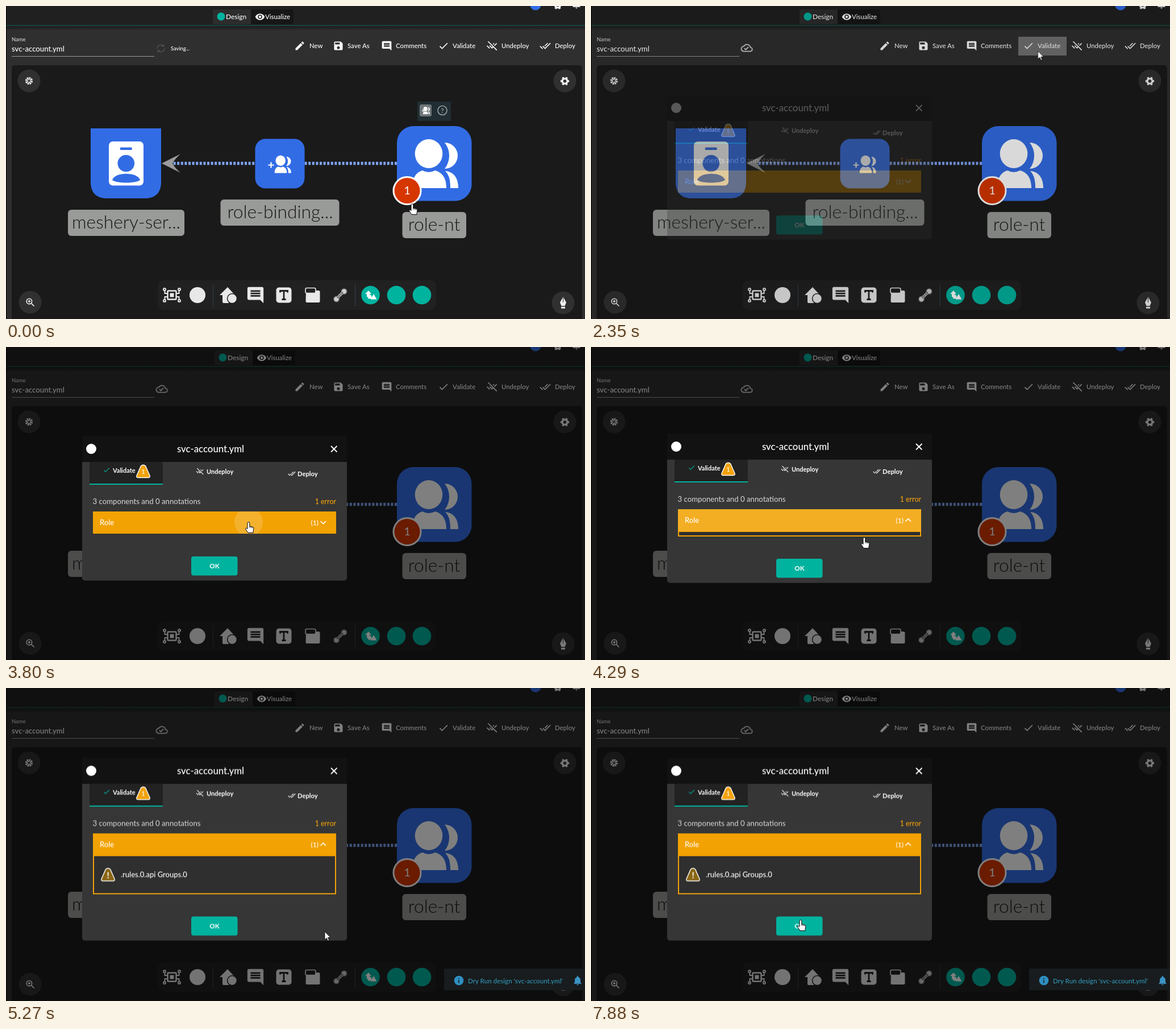
Animation, 1019 px wide and 550 px high, one loop 8000 ms. Source, as an HTML page:

```html
<!DOCTYPE html>
<html lang="en">
<head>
<meta charset="utf-8">
<title>Design validation</title>
<style>
@property --g { syntax: '<number>'; inherits: true; initial-value: 0; }
html, body { margin: 0; width: 100%; height: 100%; overflow: hidden; background: #1a1a1a; }
svg.stage { display: block; width: 100vw; height: 100vh; }
text { font-family: Lato, "Open Sans", sans-serif; font-size: 11.4px; font-weight: 500; fill: #fff; }
.mid { text-anchor: middle; }
.label { font-size: 31.8px; font-weight: 300; fill: #161616; text-anchor: middle; }
.bar { fill: #fff; }
.blue { fill: #326ce5; }
.teal { fill: #00b39f; }
.ink { fill: #e8e8e8; }

.an { animation: 8s step-end infinite; }
#tabs { animation-name: tabs; }
#saving { animation-name: saving; }
#saved { animation-name: saved; }
#tip { animation-name: tip; }
#hover { animation-name: hover; }
#press { animation-name: press; }
#shade { animation-name: shade; }
#modal { animation-name: grow, appear; transform: translateY(calc(156px - var(--g) * .5px)); }
#body { height: calc(254.5px + var(--g) * 1px); }
#detail { height: max(0px, calc(var(--g) * 1px)); }
#ok { transform: translateY(calc(var(--g) * 1px)); }
#ripple { animation-name: ripple; }
#glow { animation-name: glow; }
#down { animation-name: down; }
#up { animation-name: up; }
#item { animation-name: item; }
#row { animation-name: row; }
#toast { animation-name: toast; }
#cursor { animation-name: cursor; }
#hand { animation-name: hand; }
#arrow { animation-name: arrow; }

@keyframes tabs { 0% { transform: none } 27.875%, 100% { transform: translateX(3px) } }
@keyframes saving { 0% { opacity: 1 } 7.875%, 100% { opacity: 0 } }
@keyframes saved { 0% { opacity: 0 } 7.875%, 100% { opacity: 1 } }
@keyframes tip { 0% { opacity: 1 } 14.75% { opacity: .12 } 18.125% { opacity: .07 } 21.125%, 100% { opacity: 0 } }
@keyframes hover { 0% { opacity: 0 } 27.875% { opacity: 1 } 31% { opacity: .5 } 34%, 100% { opacity: 0 } }
@keyframes press { 0% { opacity: 0 } 26% { opacity: .18 } 27.875%, 100% { opacity: 0 } }
@keyframes shade {
  0% { opacity: 0 } 27.875% { opacity: .05 } 29.375% { opacity: .15 } 31% { opacity: .35 }
  32.5% { opacity: .47 } 34%, 100% { opacity: .5 }
}
@keyframes appear {
  0% { opacity: 0 } 27.875% { opacity: .06 } 29.375% { opacity: .29 } 31% { opacity: .7 }
  32.5% { opacity: .93 } 34%, 100% { opacity: 1 }
}
@keyframes grow {
  0% { --g: 0 } 53.625% { --g: 8 } 55.125% { --g: 26 } 56.625% { --g: 48 }
  58.125% { --g: 61 } 59.625%, 100% { --g: 67 }
}
@keyframes ripple { 0% { opacity: 0 } 45.625% { opacity: .12 } 47.5% { opacity: .17 } 49% { opacity: .08 } 50.5%, 100% { opacity: 0 } }
@keyframes glow { 0% { opacity: 0 } 50.5% { opacity: .13 } 61.125%, 100% { opacity: 0 } }
@keyframes down { 0% { opacity: 1 } 53.625%, 100% { opacity: 0 } }
@keyframes up { 0% { opacity: 0 } 53.625%, 100% { opacity: 1 } }
@keyframes item { 0% { opacity: 0 } 56.625%, 100% { opacity: 1 } }
@keyframes row { 0% { opacity: 0 } 79.625% { opacity: 1 } 95.125%, 100% { opacity: 0 } }
@keyframes toast { 0% { opacity: 0 } 55.125% { opacity: .6 } 56.625%, 100% { opacity: 1 } }
@keyframes hand {
  0% { opacity: 1 } 14.75% { opacity: 0 } 21.125% { opacity: 1 } 27.875% { opacity: 0 }
  39.625% { opacity: 1 } 55.125% { opacity: 0 } 79.625% { opacity: 1 } 95.125% { opacity: 0 } 97%, 100% { opacity: 1 }
}
@keyframes arrow {
  0% { opacity: 0 } 14.75% { opacity: 1 } 21.125% { opacity: 0 } 27.875% { opacity: 1 }
  39.625% { opacity: 0 } 55.125% { opacity: 1 } 79.625% { opacity: 0 } 95.125% { opacity: 1 } 97%, 100% { opacity: 0 }
}
@keyframes cursor {
  0% { transform: translate(714px, 348px) }
  1.5% { transform: translate(711px, 345px) }
  3% { transform: translate(708px, 342px) }
  11% { transform: translate(732px, 335px) }
  12.875% { transform: translate(779px, 211px) }
  14.75% { transform: translate(775px, 150px) }
  16.625% { transform: translate(774px, 120px) }
  18.125% { transform: translate(773px, 107px) }
  19.625% { transform: translate(785px, 80px) }
  21.125% { transform: translate(788px, 66px) }
  27.875% { transform: translate(786.5px, 79px) }
  35.875% { transform: translate(673px, 147px) }
  37.75% { transform: translate(411px, 271px) }
  39.625% { transform: translate(339px, 305px) }
  41.125% { transform: translate(362px, 306px) }
  42.625% { transform: translate(405px, 308px) }
  44.125% { transform: translate(426px, 308px) }
  53.625% { transform: translate(480px, 335px) }
  55.125% { transform: translate(550px, 375px) }
  56.625% { transform: translate(591px, 396px) }
  58.125% { transform: translate(583px, 410px) }
  61.125% { transform: translate(564px, 439px) }
  65.875% { transform: translate(561px, 428px) }
  67.375% { transform: translate(557px, 416px) }
  68.875% { transform: translate(554px, 407px) }
  75.875% { transform: translate(527px, 395px) }
  77.75% { transform: translate(357px, 362px) }
  79.625% { transform: translate(276px, 336.5px) }
  81.125% { transform: translate(290px, 336px) }
  82.625% { transform: translate(322px, 334px) }
  84.125% { transform: translate(352px, 332px) }
  86% { transform: translate(367px, 334px) }
  87.875% { transform: translate(368px, 334px) }
  93.25% { transform: translate(368px, 341px) }
  95.125% { transform: translate(368px, 386px) }
  97% { transform: translate(368px, 402px) }
  98.5%, 100% { transform: translate(368px, 408px) }
}
</style>
</head>
<body>
<svg class="stage" viewBox="0 0 1019 550" preserveAspectRatio="none">
<defs>
  <symbol id="edit" viewBox="0 0 24 24"><path d="M3 17.25V21h3.75L17.8 9.94l-3.75-3.75zM20.7 7.04c.4-.39.4-1.02 0-1.41l-2.33-2.34c-.39-.39-1.02-.39-1.41 0l-1.83 1.83 3.75 3.75z"/></symbol>
  <symbol id="save" viewBox="0 0 24 24"><path d="M17 3H5a2 2 0 0 0-2 2v14c0 1.1.9 2 2 2h14a2 2 0 0 0 2-2V7zm-5 16a3 3 0 1 1 0-6 3 3 0 0 1 0 6zm3-10H5V5h10z"/></symbol>
  <symbol id="note" viewBox="0 0 24 24"><path d="M22 4a2 2 0 0 0-2-2H4a2 2 0 0 0-2 2v12c0 1.1.9 2 2 2h14l4 4zM18 14H6v-2h12zm0-3H6V9h12zm0-3H6V6h12z"/></symbol>
  <symbol id="done" viewBox="0 0 24 24"><path d="M9 16.2 4.8 12l-1.4 1.4L9 19 21 7l-1.4-1.4z"/></symbol>
  <symbol id="all" viewBox="0 0 24 24"><path d="M18 7l-1.4-1.4-6.35 6.33 1.4 1.41zM22.2 5.6 11.7 16.2 7.5 12l-1.4 1.4 5.6 5.6 12-12zM.4 13.4 6 19l1.4-1.4L1.8 12z"/></symbol>
  <symbol id="undo" viewBox="0 0 24 24"><path d="M4.8 2 3.4 3.4l10.4 10.4-1.4 1.4-4.2-4.3-1.4 1.4 5.6 5.7 2.8-2.8 6.6 6.6 1.4-1.4zM18 12.4l5-5L21.6 6l-5 5zM17.3 7.4 16 6l-2.2 2.1 1.4 1.4zM1 12.4 6.7 18l1.4-1.4L2.5 11z"/></symbol>
  <symbol id="eye" viewBox="0 0 24 24"><path d="M12 4.5C7 4.5 2.7 7.6 1 12c1.7 4.4 6 7.5 11 7.5s9.3-3.1 11-7.5c-1.7-4.4-6-7.5-11-7.5zM12 17a5 5 0 1 1 0-10 5 5 0 0 1 0 10zm0-8a3 3 0 1 0 0 6 3 3 0 0 0 0-6z"/></symbol>
  <symbol id="gear" viewBox="0 0 24 24"><g fill="none" stroke="#f2f2f2"><circle cx="12" cy="12" r="5.600" stroke-width="4.200"/><circle cx="12" cy="12" r="8.400" stroke-width="2.600" pathLength="60" stroke-dasharray="5" stroke-dashoffset="2.5"/></g></symbol>
  <symbol id="zoom" viewBox="0 0 24 24"><g fill="none" stroke="#f2f2f2" stroke-width="2"><circle cx="9.5" cy="9.5" r="5.6"/><path d="M14 14l5.8 5.8M7 9.5h5M9.5 7v5"/></g></symbol>
  <symbol id="bell" viewBox="0 0 24 24"><path d="M12 22a2 2 0 0 0 2-2h-4c0 1.1.9 2 2 2zm6-6v-5c0-3.1-1.6-5.6-4.5-6.3V4a1.5 1.5 0 0 0-3 0v.7C7.6 5.4 6 7.9 6 11v5l-2 2v1h16v-1z"/></symbol>
  <symbol id="cloud" viewBox="0 0 24 24"><path d="M6 19h13a4 4 0 0 0 .3-8A7 7 0 0 0 6.2 9 5 5 0 0 0 6 19zM7.300 12.800l2.800 2.800 5.300-5.300" fill="none" stroke="#eee" stroke-width="1.800"/></symbol>
  <symbol id="spin" viewBox="0 0 24 24"><path d="M4 13a8 8 0 0 1 14-6M20 11a8 8 0 0 1-14 6M18.500 3v4.500H14M5.500 21v-4.500H10" fill="none" stroke="#555" stroke-width="1.600"/></symbol>
  <symbol id="info" viewBox="0 0 24 24"><path d="M12 2a10 10 0 1 0 0 20 10 10 0 0 0 0-20zm1 15h-2v-6h2zm0-8h-2V7h2z"/></symbol>
  <g id="users">
    <path d="M16-37a23 23 0 0 1 0 46 37 37 0 0 0 0-46zM17 13c14 1 23 11 23 30H26c0-14-2-23-9-30z"/>
    <ellipse cx="-12" cy="-17.500" rx="24.300" ry="25.500"/>
    <path d="M-41 43c0-19 7-28 18-31q11 6 22 0c12 3 20 12 20 31z"/>
  </g>
  <path id="tri" d="M-4-9.500Q0-13 4-9.500L11.500 7.500Q12.500 11 9 11H-9Q-12.500 11-11.500 7.500z" stroke="#fff" stroke-width="1.400"/>
  <linearGradient id="lip" x2="0" y2="1"><stop stop-color="#1d1d1d"/><stop offset="1" stop-color="#2a2a2a"/></linearGradient>
  <clipPath id="btnClip"><path d="M752 54h85v33h-85z"/></clipPath>
  <clipPath id="roleClip"><path d="M153 133h428v39H153z"/></clipPath>
</defs>

<!-- page -->
<rect width="1019" height="550" fill="#2f2f2f"/>
<rect width="1019" height="34" fill="#202020"/>
<rect y="35" width="1019" height="7" fill="url(#lip)"/>
<rect y="33.500" width="1019" height="1.500" fill="#1b5149"/>
<path d="M10 550V110q0-6 6-6h992q6 0 6 6v440z" fill="#1a1a1a"/>

<g id="tabs" class="an">
  <path d="M368 6h63v26h-67V10q0-4 4-4z" fill="#2d2d2d"/>
  <path d="M431 6h71q4 0 4 4v22h-75z" fill="#161616"/>
  <circle cx="378.500" cy="18.500" r="7" class="teal"/>
  <text x="387" y="23" style="font-size:11.900px">Design</text>
  <use href="#eye" class="bar" x="438" y="10" width="18" height="18"/>
  <text x="456" y="23">Visualize</text>
</g>
<circle cx="932" cy="-2" r="9.500" class="blue"/>
<use href="#gear" x="961" y="-12" width="20" height="20"/>
<use href="#bell" class="bar" x="994" y="-14" width="20" height="20"/>

<text x="10" y="61.500" style="font-size:9.400px;fill:#d8d8d8">Name</text>
<text x="10" y="80" style="font-size:13.200px">svc-account.yml</text>
<path d="M10 88.500h251" stroke="#9a9a9a"/>
<g id="saving" class="an">
  <use href="#spin" x="263" y="65" width="19" height="19"/>
  <text x="290" y="78" style="font-size:9.300px">Saving...</text>
</g>
<use id="saved" class="an" href="#cloud" x="263.500" y="63" width="21" height="21"/>

<rect id="hover" class="an" x="752" y="54" width="85" height="33" fill="#727272"/>
<g clip-path="url(#btnClip)"><circle id="press" class="an" cx="787" cy="70" r="32" fill="#fff"/></g>
<g class="bar">
  <use href="#edit" x="507" y="60" width="20" height="20"/>
  <use href="#save" x="575" y="60" width="20" height="20"/>
  <use href="#note" x="660" y="60" width="20" height="20"/>
  <use href="#done" x="760" y="60" width="20" height="20"/>
  <use href="#undo" x="845" y="60" width="20" height="20"/>
  <use href="#all" x="939" y="60" width="20" height="20"/>
  <text x="534" y="74">New</text>
  <text x="601" y="74">Save As</text>
  <text x="686" y="74">Comments</text>
  <text x="786" y="74">Validate</text>
  <text x="872" y="74">Undeploy</text>
  <text x="966" y="74">Deploy</text>
</g>

<!-- corner buttons -->
<g fill="#303030">
  <circle cx="40.500" cy="131.500" r="20"/><circle cx="983.500" cy="131.500" r="20"/>
  <circle cx="42.500" cy="520.500" r="20"/><circle cx="980.500" cy="521.500" r="20"/>
</g>
<circle cx="40.500" cy="131.500" r="4.200" fill="none" stroke="#eee" stroke-width="4.800" pathLength="80" stroke-dasharray="7 3"/>
<use href="#gear" x="974" y="122.500" width="19" height="19"/>
<use href="#zoom" x="33" y="511" width="20" height="20"/>
<path d="M980.500 511l5.500 10-2.500 6h-6l-2.500-6zM977 528.500h7v3h-7z" fill="#f2f2f2"/>
<path d="M980.500 512v9" stroke="#303030"/>

<!-- graph -->
<path d="M688 276.500H292" stroke="#7fa3f2" stroke-width="5.500" stroke-dasharray="4 2.600"/>
<path d="M274 276.500l33-16.500q-10 9-14 16.500 4 8 14 16.500z" fill="#9b9b9b"/>
<path d="M149 215h124V309q0 29-29 29h-66q-29 0-29-29z" class="blue"/>
<rect x="181" y="238" width="61" height="77.500" rx="7" class="bar"/>
<g class="blue">
  <rect x="200.500" y="248.500" width="21.500" height="4.500" rx="2.200"/>
  <circle cx="211.300" cy="276.500" r="14.800"/>
  <path d="M187 306c4-15 45-15 49 0-9 6-40 6-49 0z"/>
</g>
<rect x="438.500" y="233.500" width="87" height="87" rx="18" class="blue"/>
<use href="#users" class="bar" transform="translate(487.500 278) scale(.36)"/>
<path d="M461.500 279.500h10M466.500 274.500v10" stroke="#fff" stroke-width="2.200"/>
<rect x="688" y="211" width="131.500" height="131.500" rx="29" class="blue"/>
<use href="#users" class="bar" transform="translate(756 277)"/>
<circle cx="706" cy="324.500" r="24" fill="#d63600" stroke="#fff" stroke-width="3"/>
<text x="706" y="331" class="mid" style="font-size:20px;font-weight:400">1</text>
<g fill="#999b98">
  <rect x="109" y="358" width="205" height="46" rx="6"/>
  <rect x="377.500" y="340" width="209" height="46" rx="6"/>
  <rect x="697.500" y="362" width="112.500" height="46" rx="6"/>
</g>
<text class="label" x="211.500" y="391">meshery-ser...</text>
<text class="label" x="482.500" y="372.500">role-binding...</text>
<text class="label" x="753.500" y="395">role-nt</text>

<g id="tip" class="an">
  <rect x="724" y="168" width="59" height="34" fill="#212e33"/>
  <rect x="728" y="173" width="21" height="21" rx="3" fill="#70767a"/>
  <use href="#users" class="bar" transform="translate(740 183.500) scale(.15)"/>
  <path d="M732 184h4M734 182v4" stroke="#fff"/>
  <circle cx="768" cy="183.500" r="8" fill="none" stroke="#979da0" stroke-width="1.600"/>
  <text x="768" y="187.800" class="mid" style="font-size:12px;fill:#a8adaf">?</text>
</g>

<!-- tool dock -->
<rect x="267" y="482" width="490" height="52" rx="10" fill="#212121"/>
<path d="M364.500 489v39M614.500 489v39" stroke="#33404a"/>
<g fill="none" stroke="#e8e8e8" stroke-width="2">
  <rect x="284.500" y="500.500" width="15" height="15" rx="1" stroke-width="2.500"/>
  <path d="M284 505h-4.500v-5M300 505h4.500v-5M284 511h-4.500v5M300 511h4.500v5"/>
  <circle cx="279" cy="498" r="2"/><circle cx="305" cy="498" r="2"/>
  <circle cx="279" cy="518" r="2"/><circle cx="305" cy="518" r="2"/>
</g>
<rect x="288.500" y="504.500" width="7" height="7" class="ink"/>
<circle cx="337" cy="508" r="14" class="ink"/>
<path d="M390 494l13 14h-11v14h-9q-2 0-2-2v-12h-5z" class="ink"/>
<circle cx="398" cy="514" r="8.500" class="ink" stroke="#212121" stroke-width="1.500"/>
<use href="#note" class="ink" x="422" y="491" width="34" height="34"/>
<rect x="475.500" y="494.500" width="27" height="27" rx="5" class="ink"/>
<path d="M482.500 503.500v-3h13v3M489 501v14M485.500 515.500h7" fill="none" stroke="#212121" stroke-width="2.800"/>
<path d="M528 500h22q2.500 0 2.500 2.500v16q0 2.500-2.500 2.500h-20q-2.500 0-2.500-2.500z" class="ink"/>
<rect x="527" y="495.500" width="18" height="9" rx="2.500" fill="#212121" stroke="#e8e8e8" stroke-width="1.600"/>
<path d="M582 514l12-12" stroke="#aaa" stroke-width="5"/>
<g fill="#d0d0d0" stroke="#888" stroke-width="1.500"><circle cx="581.500" cy="515" r="4.500"/><circle cx="595" cy="501.500" r="4.500"/></g>
<path d="M583 513l10-10" stroke="#333" stroke-width="1.500" stroke-dasharray="2 2"/>
<g class="teal"><circle cx="641.500" cy="508" r="16.300"/><circle cx="687" cy="508" r="16.300"/><circle cx="732" cy="508" r="16.300"/></g>
<g class="bar"><path d="M638 500l5 6h-3v5h-5v-5h-3z"/><circle cx="640" cy="511" r="3.500"/><path d="M647 506l5.500 9.500h-11z"/></g>

<rect id="shade" class="an" x="1" width="1018" height="550"/>

<!-- notice -->
<g id="toast" class="an">
  <rect x="771" y="493" width="248" height="38" fill="#181c1e"/>
  <use href="#info" x="787" y="504" width="20" height="20" fill="#2f8fc0"/>
  <text x="813" y="518.500" style="font-size:11.600px;fill:#3296b4">Dry Run design 'svc-account.yml'</text>
  <use href="#bell" x="996" y="504" width="20" height="20" fill="#3b93c4"/>
</g>

<!-- dialog -->
<g id="modal" class="an">
  <rect id="body" x="134" width="466" rx="5" fill="#363636"/>
  <path d="M134 46V5q0-5 5-5h456q5 0 5 5v41z" fill="#121212"/>
  <circle cx="150" cy="23" r="9" class="bar"/>
  <text x="360" y="29" class="mid" style="font-size:16.800px">svc-account.yml</text>
  <path d="M572 18l10.500 10.500M582.500 18L572 28.500" stroke="#fff" stroke-width="1.800"/>
  <path d="M147 46h129v38H147z" fill="#222"/>
  <path d="M147 84h129v2H147z" class="teal"/>
  <use href="#done" class="teal" x="170" y="53" width="14" height="14"/>
  <text x="188" y="64.500" style="font-size:11px;font-weight:700">Validate</text>
  <use href="#tri" x="241.500" y="62.500" fill="#f2a20a"/>
  <text x="241.500" y="67" class="mid" style="font-size:11px">1</text>
  <g class="bar">
    <use href="#undo" x="334" y="55.500" width="14" height="14"/>
    <use href="#all" x="496" y="59.500" width="14" height="14"/>
  </g>
  <text x="353" y="67" style="font-size:11px;font-weight:700">Undeploy</text>
  <text x="513" y="70.500" style="font-size:11.200px;font-weight:700">Deploy</text>
  <text x="152.500" y="119.500" style="font-size:13.200px;font-weight:400;fill:#d8d8d8">3 components and 0 annotations</text>
  <text x="581" y="119.500" text-anchor="end" style="font-size:12.400px;fill:#f2a20a">1 error</text>

  <rect id="detail" x="154" y="172" width="426" fill="#2f2f2f" stroke="#f2a20a" stroke-width="2"/>
  <g id="item" class="an">
    <rect id="row" class="an" x="155" y="179.500" width="424" height="52" fill="#5e4a25"/>
    <use href="#tri" x="179.500" y="205.500" fill="#8a6716"/>
    <text x="179.500" y="211.500" class="mid" style="font-size:15px;font-weight:700">!</text>
    <text x="202" y="209.500" style="font-size:13px">.rules.0.api Groups.0</text>
  </g>
  <rect x="153" y="133" width="428" height="39" fill="#f2a202"/>
  <g clip-path="url(#roleClip)"><circle id="ripple" class="an" cx="427" cy="152" r="25" fill="#fff"/></g>
  <rect id="glow" class="an" x="153" y="133" width="428" height="39" fill="#fff"/>
  <text x="165" y="156.500" style="font-size:13px">Role</text>
  <text x="536.500" y="156.500" style="font-size:12px">(1)</text>
  <g fill="none" stroke="#fff" stroke-width="1.700">
    <path id="down" class="an" d="M553.500 150l4.800 4.500 4.800-4.500"/>
    <path id="up" class="an" d="M553.500 154.500l4.800-4.500 4.800 4.500"/>
  </g>
  <g id="ok">
    <rect x="326" y="212" width="81.500" height="33.500" rx="4" class="teal"/>
    <text x="367" y="232.500" class="mid" style="font-size:11.600px;font-weight:700">OK</text>
  </g>
</g>

<g id="cursor" class="an" stroke="#000" fill="#fff" stroke-linejoin="round">
  <g id="hand" class="an">
    <path d="M-1 1.500a1.900 1.900 0 0 1 3.800 0V7l5.500 1.300q1.900.5 1.700 2.500l-1 5V18.500h-9l-4.200-6.300q-.8-1.500.5-2 1.200-.3 2.700 1.400z"/>
    <path d="M2.800 7v3M5.300 7.800v2.500M7.700 8.500v2.300" fill="none" stroke-width=".8"/>
  </g>
  <path id="arrow" class="an" d="M0 0V14.300l3.300-3 2.100 4.900 2.200-1-2.100-4.700H10z" stroke-width=".8"/>
</g>
<path d="M.5 0v550" stroke="#000"/>
</svg>
</body>
</html>
```
